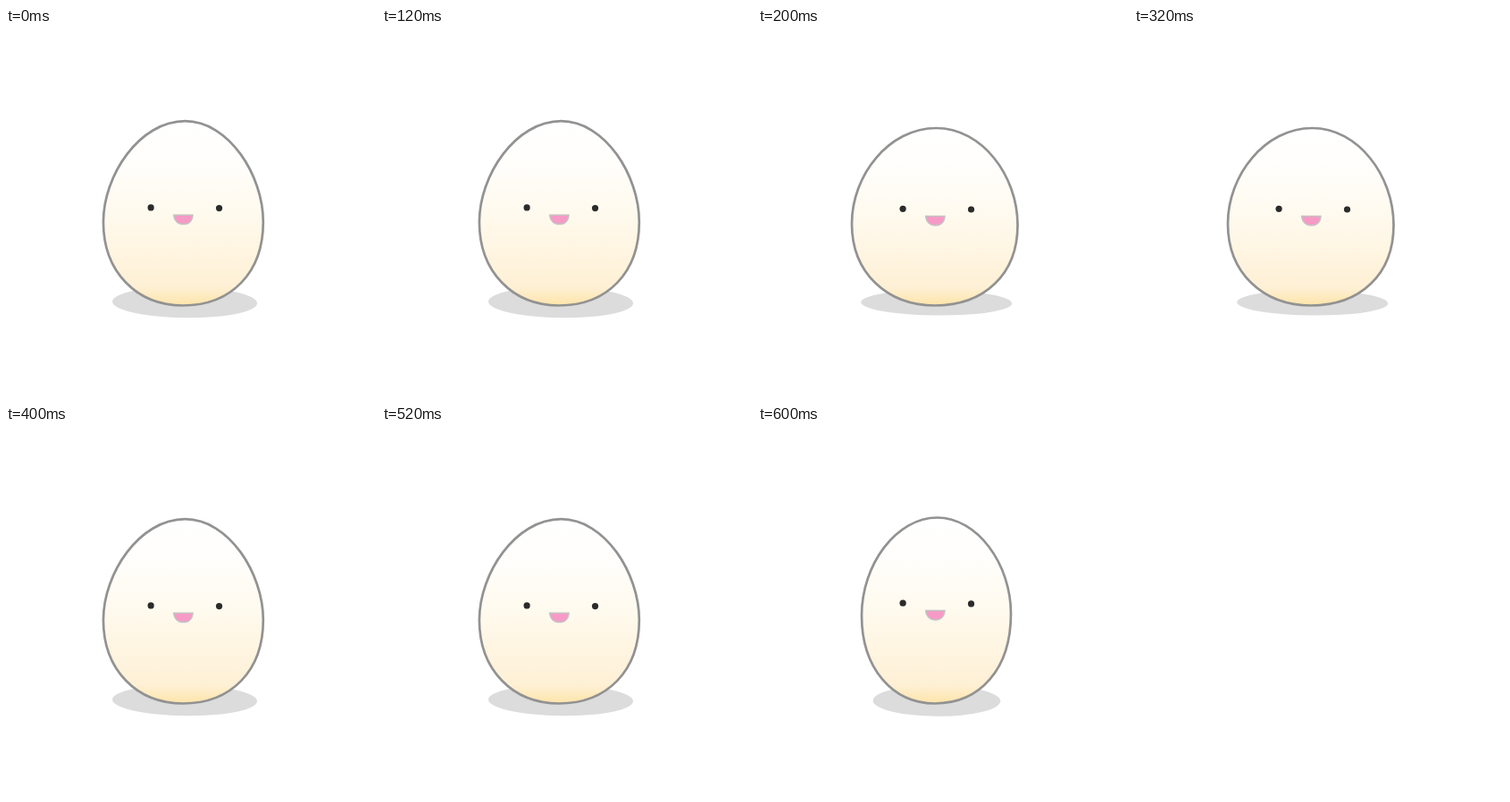
Write an HTML page that moves like this. It is 414 px wide and 414 px high and loops after 0.8 s.

```html
<!DOCTYPE html>
<html lang="en">
<head>
<meta charset="utf-8">
<title>Bouncing egg</title>
<style>
  html, body { margin: 0; width: 100%; height: 100%; overflow: hidden; background: #fff; }
  svg { display: block; width: 100%; height: 100%; }
</style>
</head>
<body>
<svg viewBox="0 0 414 414">
  <defs>
    <linearGradient id="shell" x1="0" y1="0" x2="0" y2="1">
      <stop offset="0" stop-color="#fff"/>
      <stop offset=".2" stop-color="#fffefc"/>
      <stop offset=".5" stop-color="#fffaee"/>
      <stop offset=".9" stop-color="#fef0d5"/>
      <stop offset="1" stop-color="#fde4a9"/>
    </linearGradient>
  </defs>
  <ellipse id="shadow" fill="#dcdcdc"/>
  <path id="egg" fill="url(#shell)" stroke="#929292" stroke-width="2.7"/>
  <g id="face">
    <circle cx="162.1" cy="-8.3" r="3.6" fill="#2b2b2b"/>
    <circle cx="238.5" cy="-7.6" r="3.6" fill="#2b2b2b"/>
    <path d="M187.7 0H209C208.6 6.6 204.6 10.4 198.6 10.4S188.2 6.6 187.7 0Z"
          fill="#f79ac6" stroke="#c6c2c4" stroke-width="1.5"/>
  </g>
</svg>
<script>
  const BEAT = 200;
  const BOTTOM = { x: 198, y: 310.5 };
  const part = id => document.getElementById(id);
  const egg = part('egg'), shadow = part('shadow'), face = part('face');

  // top and sides are outline points; bend sets the handle lengths above the widest line
  const rest = {
    top: [200.5, 104.2], left: [108.9, 217], right: [287.8, 217], bend: [.56, .46],
    shadow: [200, 307, 81, 17.3], tilt: .7, mouth: 209.2
  };
  const squash = {
    top: [199.5, 112], left: [105, 219], right: [290.5, 220.5], bend: [.56, .51],
    shadow: [199.7, 307.5, 84.5, 14], tilt: .5, mouth: 210.6
  };
  const stretch = {
    top: [200.5, 102.5], left: [116, 212], right: [283, 210], bend: [.54, .52],
    shadow: [200, 307.5, 71.3, 17.3], tilt: .3, mouth: 206.5
  };
  const cycle = [rest, squash, rest, stretch];

  const mix = (a, b, k) => a + (b - a) * k;

  function outline({ top: [tx, ty], left: [lx, ly], right: [rx, ry], bend: [across, down] }) {
    const { x: bx, y: by } = BOTTOM;
    return `M${tx} ${ty}
      C${mix(tx, rx, across)} ${ty} ${rx} ${mix(ry, ty, down)} ${rx} ${ry}
      C${rx} ${mix(ry, by, .61)} ${mix(bx, rx, .6)} ${by} ${bx} ${by}
      C${mix(bx, lx, .58)} ${by} ${lx} ${mix(ly, by, .6)} ${lx} ${ly}
      C${lx} ${mix(ly, ty, down)} ${mix(tx, lx, across)} ${ty} ${tx} ${ty}Z`;
  }

  function draw(time) {
    const pose = cycle[Math.floor(time / BEAT) % cycle.length];
    const [cx, cy, rx, ry] = pose.shadow;
    egg.setAttribute('d', outline(pose));
    Object.entries({ cx, cy, rx, ry }).forEach(([k, v]) => shadow.setAttribute(k, v));
    shadow.setAttribute('transform', `rotate(${pose.tilt} ${cx} ${cy})`);
    face.setAttribute('transform', `translate(0 ${pose.mouth})`);
  }

  const start = performance.now();
  function tick() {
    draw(performance.now() - start);
    requestAnimationFrame(tick);
  }
  tick();
</script>
</body>
</html>
```
